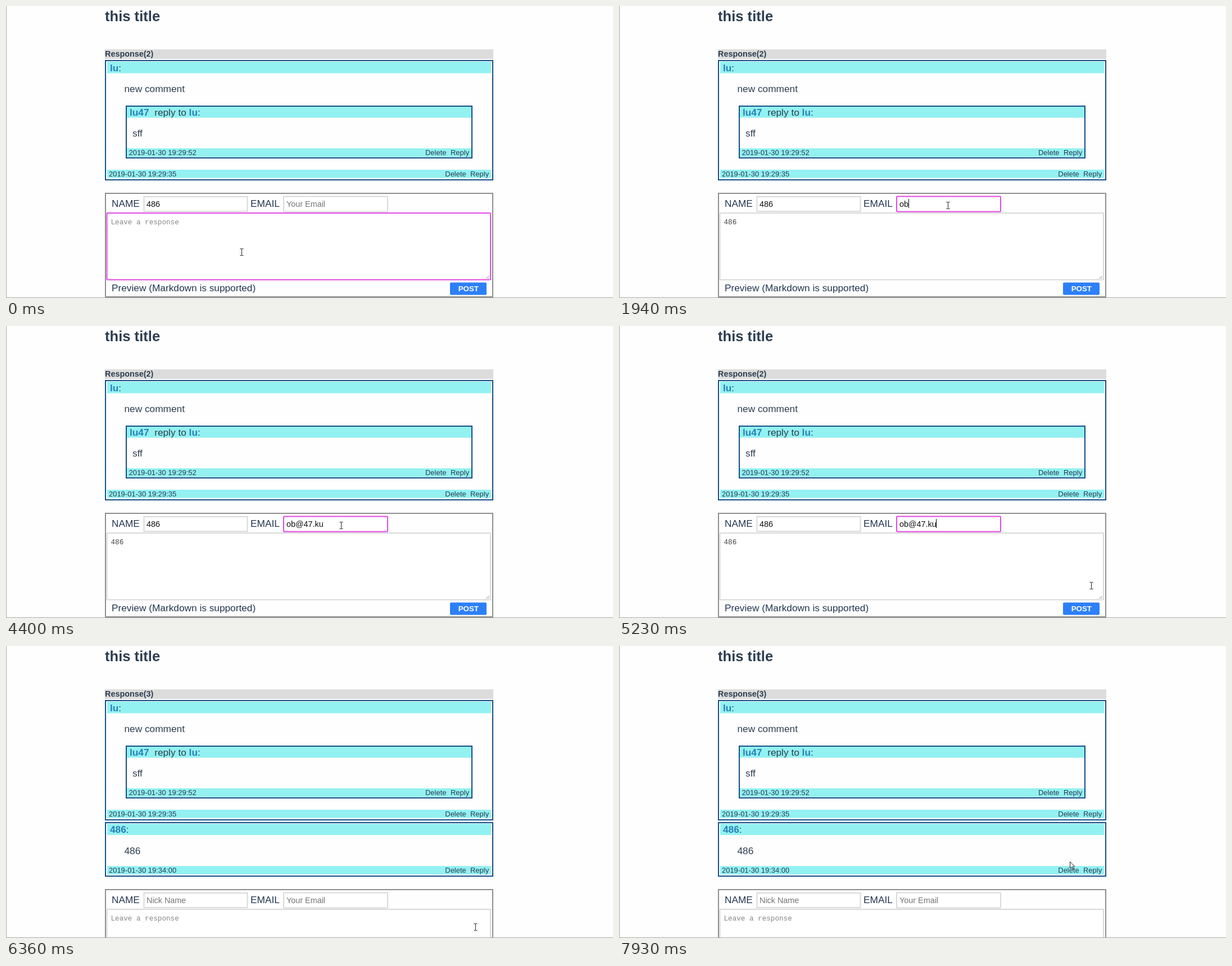
Recreate the animation shown at these times as an HTML page. Size 1080 by 519 pixels, loop 7990 ms.

```html
<!DOCTYPE html>
<html lang="en">
<head>
<meta charset="utf-8">
<title>Comment form</title>
<style>
  html, body { margin: 0; width: 100%; height: 100%; overflow: hidden; background: #fefefe; }
  svg { display: block; width: 100%; height: 100%; }
  text { font: 17.28px "Liberation Sans", Arial, sans-serif; fill: #2c3e50; white-space: pre; }
  .title { font-size: 25.6px; font-weight: bold; }
  .count { font-size: 14.4px; font-weight: bold; }
  .small { font-size: 12.96px; fill: #263a55; }
  .label { fill: #22364f; }
  .user { font-weight: bold; fill: #2980b9; }
  .field { font-size: 14.4px; fill: #111; }
  .area { font: 12.64px "Liberation Mono", monospace; fill: #444; }
  .hint { fill: #757575; }
  .area.hint { fill: #858585; }
  .band { fill: #93f1f1; }
  .box { fill: none; stroke: #134f86; stroke-width: 2; }
  .form { fill: none; stroke: #8e8e8e; stroke-width: 2; }
  .input { fill: #fff; stroke: #d9d9d9; stroke-width: 2; }
  .input.on { stroke: #e448e4; }
  .post { fill: #2d7ff9; }
  .post-text { font-size: 13.33px; font-weight: bold; fill: #fff; }
  .hover .post { fill: #fff; stroke: #2d86f5; stroke-width: 2; }
  .hover .post-text { fill: #2d7ff9; }
  .caret { fill: #000; }
  .edge { fill: #a6a6a6; }
  #pointer path { fill: none; stroke: #222; stroke-width: 1; }
  #pointer .solid { fill: #fff; stroke-linejoin: round; }
</style>
</head>
<body>
<svg viewBox="0 0 1080 519">
  <text class="title" x="176" y="27">this title</text>
  <rect x="176" y="77" width="691" height="17" fill="#dcdcdc"/>
  <text class="count" id="count" x="176" y="90"></text>

  <rect class="box" x="177" y="97" width="689" height="212"/>
  <rect class="band" x="180" y="99" width="683" height="20.5"/>
  <text x="185" y="115.5"><tspan class="user">lu</tspan>:</text>
  <text x="210.5" y="153">new comment</text>

  <rect class="box" x="214" y="178" width="615" height="92"/>
  <rect class="band" x="215" y="179" width="613" height="19.5"/>
  <text x="220" y="194.5"><tspan class="user">lu47</tspan>&#160;&#160;reply to&#160;<tspan class="user">lu</tspan>:</text>
  <text x="225" y="232">sff</text>
  <rect class="band" x="215" y="253" width="613" height="15.5"/>
  <text class="small" x="218.5" y="265">2019-01-30 19:29:52</text>
  <text class="small" x="746" y="265">Delete</text>
  <text class="small" x="791" y="265">Reply</text>

  <rect class="band" x="180" y="291" width="683" height="14.5"/>
  <text class="small" x="183" y="302.5">2019-01-30 19:29:35</text>
  <text class="small" x="781.3" y="302.5">Delete</text>
  <text class="small" x="826" y="302.5">Reply</text>

  <g id="added">
    <rect class="box" x="177" y="314" width="689" height="95"/>
    <rect class="band" x="180" y="316" width="683" height="20"/>
    <text x="185" y="332"><tspan class="user">486</tspan>:</text>
    <text x="210.5" y="369.5">486</text>
    <rect class="band" x="180" y="391" width="683" height="15"/>
    <text class="small" x="183" y="402.5">2019-01-30 19:34:00</text>
    <text class="small" x="781.3" y="402.5">Delete</text>
    <text class="small" x="826" y="402.5">Reply</text>
  </g>

  <g id="form">
    <rect class="form" x="177" y="333" width="689" height="184"/>
    <text class="label" x="188" y="356.5">NAME</text>
    <rect class="input" x="245.5" y="339" width="184" height="26"/>
    <text id="name" x="250" y="356.5"></text>
    <text class="label" x="435" y="356.5">EMAIL</text>
    <rect class="input" id="mailBox" x="494" y="338.5" width="185" height="27" rx="1"/>
    <text id="mail" x="499" y="356.5"></text>
    <rect class="input" id="msgBox" x="179.5" y="368" width="682.5" height="118.5" rx="1"/>
    <text id="msg" x="186.5" y="388"></text>
    <path d="M854.5 484.5l5-5M857.5 484.5l2-2" stroke="#888" fill="none"/>
    <rect class="caret" id="caret" width="1"/>
    <text class="label" x="188" y="507">Preview (Markdown is supported)</text>
    <g id="button">
      <rect class="post" x="790" y="491.5" width="65" height="22" rx="2"/>
      <text class="post-text" x="804.7" y="507">POST</text>
    </g>
  </g>

  <rect class="edge" width="1" height="519"/>
  <rect class="edge" y="518" width="1080" height="1"/>

  <g id="pointer">
    <path id="beam" d="M-3 -6h2.5l.5 .5l.5 -.5h2.5M-3 6h2.5l.5 -.5l.5 .5h2.5M0 -5.5v11"/>
    <path id="arrow" class="solid" d="M.5 .5v11.5l2.7 -2.5l2 4.6l1.8 -.8l-2 -4.4h3.8z"/>
    <path id="hand" class="solid" d="M-1.5 7.5v-5q0 -1.3 1.2 -1.3t1.2 1.3v4.2l1.7 .2l2 .6l1.5 1.3v3.4l-1 2v2.2h-6.2v-1.4l-3 -4.2q-.6 -1.3 .6 -1.6z M2.5 7v2M4.5 7.5v2"/>
  </g>
</svg>
<script>
const LOOP = 7990, FOCUS_MAIL = 1225, CLICK = 5890, CLEARED = 6190, POSTED = 6360;
const $ = id => document.getElementById(id);

const msg = { text: "486", keys: [60, 165, 270] };
const mail = { text: "ob@47.ku", keys: [1590, 1750, 2430, 2740, 2920, 3600, 3720, 3840] };

// time, x, y of the pointer's hot spot
const path = [
  [580, 420, 437], [640, 424, 434], [800, 460, 412], [1000, 530, 375], [1170, 583, 350],
  [1590, 583, 351], [1700, 586, 354], [2740, 586, 354], [2860, 593, 357], [4340, 593, 357],
  [4400, 597, 354], [4600, 680, 347], [4800, 780, 350], [4950, 812, 370], [5080, 824, 410],
  [5170, 836, 440], [5230, 841, 461], [5400, 841, 490], [5700, 836, 500], [6620, 836, 499],
  [6700, 816, 483], [6860, 650, 372], [7000, 400, 210], [7080, 329, 172], [7180, 370, 190],
  [7470, 634, 304], [7600, 712, 341], [7760, 778, 371], [7930, 802, 383]
];
const shapes = [
  [0, "beam"], [4610, "arrow"], [4940, "beam"], [5390, "arrow"], [5410, "hand"],
  [POSTED, "beam"], [6720, "arrow"]
];

function pointAt(t) {
  const i = path.findIndex(p => p[0] > t);
  if (i < 1) return path.at(i).slice(1);
  const a = path[i - 1], b = path[i], k = (t - a[0]) / (b[0] - a[0]);
  return [a[1] + (b[1] - a[1]) * k, a[2] + (b[2] - a[2]) * k];
}

const typed = (f, t) => f.text.slice(0, f.keys.filter(k => k <= t).length);

function fill(id, kind, value, hint) {
  const el = $(id), text = value || hint;
  if (el.textContent !== text) el.textContent = text;
  el.setAttribute("class", value ? kind : kind + " hint");
}

function show(id, on) {
  $(id).style.display = on ? "" : "none";
}

function drawCaret(t, inMsg, inMail) {
  const keys = inMsg ? msg.keys : [FOCUS_MAIL, ...mail.keys];
  const last = keys.filter(k => k <= t).pop();
  const on = (inMsg || inMail) && last !== undefined && (t - last) % 1000 < 500;
  show("caret", on);
  if (!on) return;
  const el = $(inMsg ? "msg" : "mail");
  const width = typed(inMsg ? msg : mail, t) ? el.getComputedTextLength() : 0;
  const start = inMsg ? 186.5 : 499;
  $("caret").setAttribute("x", Math.floor(start + width));
  $("caret").setAttribute("y", inMsg ? 377 : 343);
  $("caret").setAttribute("height", inMsg ? 14 : 16);
}

function draw(t) {
  const cleared = t >= CLEARED, posted = t >= POSTED;
  const inMsg = t < FOCUS_MAIL, inMail = !inMsg && t < CLICK;

  fill("name", "field", cleared ? "" : "486", "Nick Name");
  fill("mail", "field", cleared ? "" : typed(mail, t), "Your Email");
  fill("msg", "area", cleared ? "" : typed(msg, t), "Leave a response");
  $("msgBox").classList.toggle("on", inMsg);
  $("mailBox").classList.toggle("on", inMail);
  drawCaret(t, inMsg, inMail);

  $("count").textContent = `Response(${posted ? 3 : 2})`;
  show("added", posted);
  $("form").setAttribute("transform", `translate(0 ${posted ? 100 : 0})`);

  const shape = shapes.filter(s => s[0] <= t).pop()[1];
  for (const id of ["beam", "arrow", "hand"]) show(id, id === shape);
  $("button").classList.toggle("hover", shape === "hand");
  const [x, y] = pointAt(t).map(Math.round);
  const half = shape === "beam" ? 0.5 : 0;
  $("pointer").setAttribute("transform", `translate(${x - half} ${y + half})`);
}

const start = performance.now();
function tick() {
  draw((performance.now() - start) % LOOP);
  requestAnimationFrame(tick);
}
tick();
</script>
</body>
</html>
```
